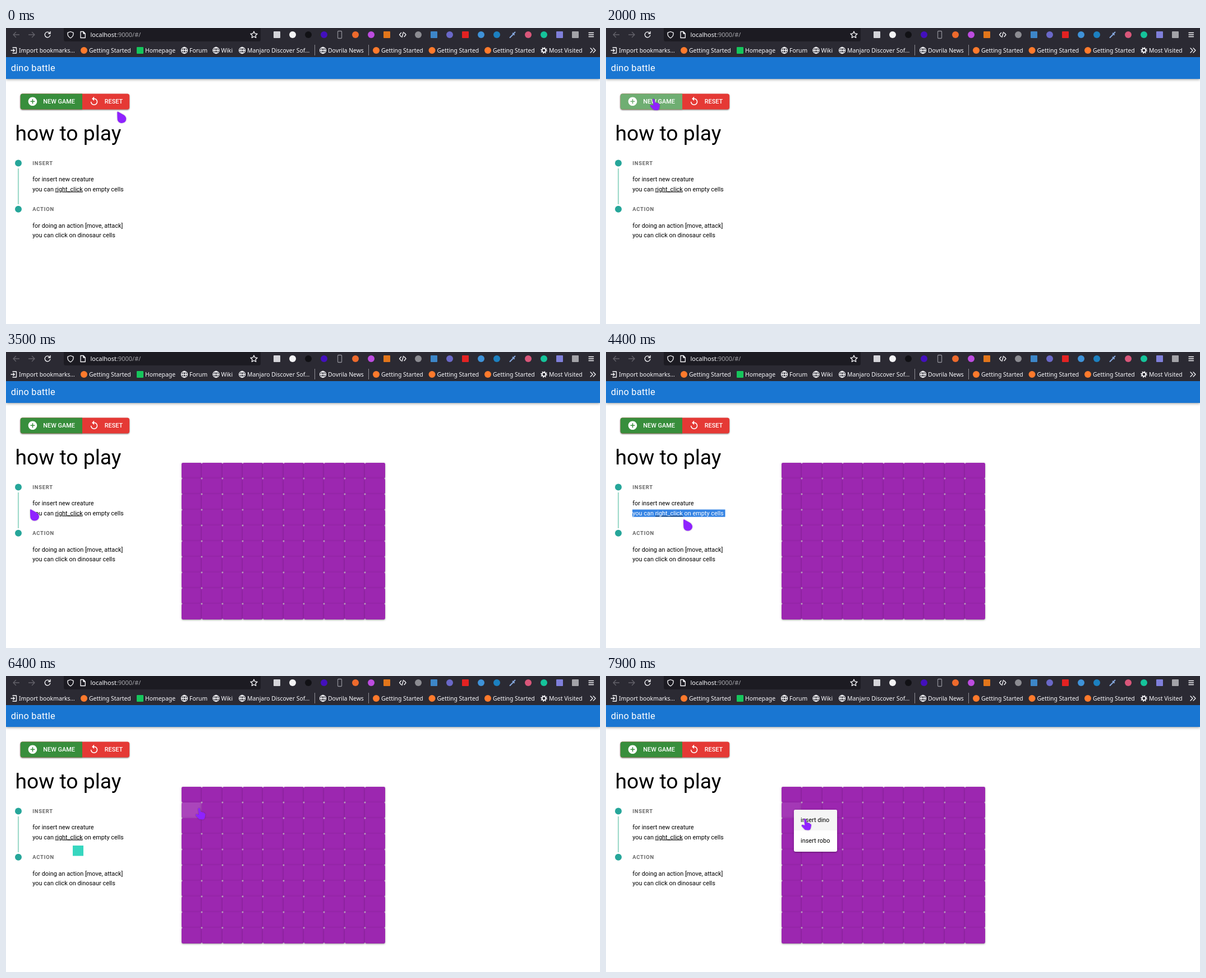
These frames come from a looping animation (1059 by 529 pixels, 8 s). An HTML page:

```html
<!DOCTYPE html>
<html lang="en">
<head>
<meta charset="utf-8">
<title>dino battle</title>
<style>
html, body { margin: 0; width: 100%; height: 100%; overflow: hidden; background: #fff; }
svg, #board, #menu { position: absolute; left: 0; top: 0; }
svg text { white-space: pre; font-family: Roboto, sans-serif; font-size: 10.9px; }
#chrome text { font-family: "Noto Sans", sans-serif; font-size: 10.4px; fill: #fbfbfe; }
.sub { font-weight: 700; letter-spacing: .78px; fill: #666; }
.btn { font-weight: 500; fill: #fff; }
.line { fill: none; stroke: #fbfbfe; stroke-width: 1.3; stroke-linecap: round; stroke-linejoin: round; }
.dim { stroke: #64636b; }
#board i, #menu, #menu b { position: absolute; }
#board i, #menu { box-shadow: 0 .8px 4px rgba(0,0,0,.2), 0 1.6px 1.6px rgba(0,0,0,.14), 0 2.3px .8px -1.6px rgba(0,0,0,.12); }
#board i { width: 36.35px; height: 28px; border-radius: 2.4px; background: #9c27b0; }
#menu { left: 334.5px; top: 239px; width: 77px; height: 74.5px; border-radius: 3px; background: #fff; overflow: hidden; }
#menu b {
  left: 0; width: 64.5px; height: 37.25px; padding-left: 12.5px;
  font: 400 10.9px/37.25px Roboto, sans-serif; color: #000;
}
</style>
</head>
<body>
<svg width="1059" height="529" viewBox="0 0 1059 529">
  <clipPath id="pill"><rect x="25.7" y="117.4" width="194.4" height="28" rx="4"/></clipPath>

  <rect y="52" width="1059" height="39" fill="#1976d2" style="filter:drop-shadow(0 1.6px 2.5px rgba(0,0,0,.4))"/>
  <text x="8.8" y="76.8" fill="#fff" style="font-size:16.4px;letter-spacing:.16px">dino battle</text>

  <g id="chrome">
    <rect width="1059" height="52" fill="#2b2a33"/>
    <path d="M103 0H454V20.5Q454 24 450.5 24H106.5Q103 24 103 20.5Z" fill="#1c1b22"/>
    <path class="line dim" d="M23.5 12H13M17.5 7.500L13 12L17.5 16.5M40.5 12H51M46.5 7.5L51 12L46.5 16.5"/>
    <path class="line" d="M78 9.2A4.8 4.8 0 1 0 78.8 12.8M79 6.5V10H75.5"/>
    <path class="line" d="M115 6.5L120 8.3V11.5Q119.5 15.5 115 17.8Q110.5 15.5 110 11.5V8.3Z"/>
    <path class="line" d="M133 6.5H138L141.3 10V17.5H133ZM138 6.5V10H141.3"/>
    <path class="line" d="M442 6L443.8 9.9L448 10.4L444.9 13.2L445.7 17.4L442 15.3L438.3 17.4L439.1 13.2L436 10.4L440.2 9.9Z"/>
    <text x="150.5" y="15.5" style="font-size:11px">localhost<tspan fill="#a5a5aa">:9000/#/</tspan></text>
    <rect class="line" x="591.5" y="5.5" width="7" height="13" rx="1.3" style="stroke:#8d8d95"/>
    <path class="line" d="M704.5 8.5L701.5 12L704.5 15.5M710 8.5L713 12L710 15.5M708.5 7.5L706 16.5"/>
    <path class="line" d="M898.5 17L904 11.5M903.5 9.5L906 12M905.5 9.5L907.5 7.5" style="stroke:#86a8de;stroke-width:2"/>
    <path class="line" d="M1039 8.5H1047.5M1039 12H1047.5M1039 15.5H1047.5"/>
    <path class="line" d="M12 35H18.5V45H12M9 40H15M13 37.8L15.2 40L13 42.2"/>
    <path d="M550.5 30V49M646.5 30V49" stroke="#8f8f95"/>
    <circle cx="959" cy="40" r="3.4" class="line" style="stroke-width:2"/>
    <circle cx="959" cy="40" r="5" class="line" style="stroke-width:1.8;stroke-dasharray:1.6 2.327;stroke-linecap:butt"/>
    <path class="line" d="M1042 36L1046 40L1042 44M1047 36L1051 40L1047 44"/>
  </g>

  <g style="filter:drop-shadow(0 1px 1.1px rgba(0,0,0,.5))">
    <g clip-path="url(#pill)">
      <rect x="25" y="117" width="196" height="29" fill="#e53935"/>
      <svg width="136" height="146">
        <rect x="25" y="117" width="111" height="29" fill="#388e3c"/>
        <rect id="hover" x="25" y="117" width="111" height="29" fill="#fff"/>
        <circle id="ripple" cx="86" cy="131" fill="#fff" fill-opacity=".17"/>
      </svg>
    </g>
  </g>
  <path transform="translate(38.1 121.9) scale(.78)" fill="#fff" d="M12 2C6.48 2 2 6.48 2 12s4.48 10 10 10 10-4.48 10-10S17.52 2 12 2zm5 11h-4v4h-2v-4H7v-2h4V7h2v4h4v2z"/>
  <path transform="translate(147.7 121.7) scale(.78)" fill="#fff" d="M12 5V1L7 6l5 5V7c3.31 0 6 2.69 6 6s-2.69 6-6 6-6-2.69-6-6H4c0 4.42 3.58 8 8 8s8-3.58 8-8-3.58-8-8-8z"/>
  <text class="btn" x="66.3" y="134.6">NEW GAME</text>
  <text class="btn" x="175.8" y="134.6">RESET</text>

  <text x="16.4" y="200.9" style="font-size:37.3px">how to play</text>
  <path d="M22 251V315" stroke="#9fdacb" stroke-width="2.2"/>
  <circle cx="22" cy="241.4" r="6" fill="#26a69a"/>
  <circle cx="22" cy="323.8" r="6" fill="#26a69a"/>
  <text class="sub" x="47.3" y="245" style="font-size:9.4px">INSERT</text>
  <text x="47.3" y="274.3">for insert new creature</text>
  <text x="47.3" y="291.5">you can <tspan text-decoration="underline">right_click</tspan> on empty cells</text>
  <text class="sub" x="47.3" y="327.4" style="font-size:9.4px">ACTION</text>
  <text x="47.3" y="356.7">for doing an action [move, attack]</text>
  <text x="47.3" y="373.9">you can click on dinosaur cells</text>

  <g id="select">
    <rect x="47" y="281.5" width="165.5" height="13.2" fill="#3584e4"/>
    <path d="M88 293.3H137" stroke="#10243e"/>
    <text x="47.3" y="291.5" fill="#fff">you can right_click on empty cells</text>
  </g>
  <rect id="badge" x="119" y="303" width="19" height="18.5" fill="#36d6bf"/>
</svg>

<div id="board"></div>
<div id="menu"><b id="dino" style="top:0">insert dino</b><b style="top:37.25px">insert robo</b></div>

<svg width="1059" height="529" viewBox="0 0 1059 529">
  <g id="cursor" fill="#8f22ff" style="filter:drop-shadow(0 .6px .8px rgba(0,0,0,.3))">
    <path id="drop" d="M0 1.2Q.2 -.3 1.6 .4L11.5 6Q16 9 16 13.5A8 8 0 0 1 .6 15.5Q0 12 0 1.2Z"/>
    <path id="hand" transform="translate(-6 -1.5)" d="M5 3Q5.5 0 8 1.5L9.8 8Q12 7 13 8.8Q15 8 15.6 10Q18 10 18 12.5L17 18Q16 22 12 21.5L7 21Q4 18 1 14.5Q0 12 2.2 11.8L6.5 13Z"/>
  </g>
</svg>

<script>
const LOOP = 8000, STEP = 100;
const $ = id => document.getElementById(id);

function add(tag, attrs, text = '') {
  const el = document.createElementNS('http://www.w3.org/2000/svg', tag);
  for (const k in attrs) el.setAttribute(k, attrs[k]);
  el.textContent = text;
  $('chrome').appendChild(el);
}

const marks = {
  dot: (x, y, fill) => add('circle', { cx: x, cy: y, r: 6, fill }),
  box: (x, y, fill) => add('rect', { x: x - 6, y: y - 6, width: 12, height: 12, rx: 1, fill }),
  globe: (x, y) => add('path', {
    class: 'line',
    d: `M${x - 5.5} ${y}a5.5 5.5 0 1 0 11 0a5.5 5.5 0 1 0 -11 0h11M${x} ${y - 5.5}q-5 5.5 0 11q5 -5.5 0 -11`
  })
};

// evenly spaced toolbar buttons; "-" leaves room for a drawn icon
`box#d5d5da dot#f4f4f6 dot#111115 dot#4310bd - dot#ed6a2c dot#bd4ce0 box#e2761b - dot#8c8c92 box#3d86c8
 dot#6a68c8 box#e32222 dot#3f92d8 dot#1c80c0 - dot#d9577a dot#15c39a box#7f7fda box#a3a3a8`
  .split(/\s+/).forEach((spec, i) => {
    const [kind, hex] = spec.split('#');
    if (hex) marks[kind](483 + 28 * i, 12, '#' + hex);
  });

function bookmark(x, label, kind, fill) {
  add('text', { x, y: 43.6 }, label);
  if (kind) marks[kind](x - 9, 40, fill);
}
bookmark(23, 'Import bookmarks...');
bookmark(248, 'Homepage', 'box', '#16c65c');
bookmark(327, 'Forum', 'globe');
bookmark(383.5, 'Wiki', 'globe');
bookmark(430, 'Manjaro Discover Sof...', 'globe');
bookmark(574, 'Dovrila News', 'globe');
bookmark(968, 'Most Visited');
for (const x of [148, 669, 768.5, 868]) bookmark(x, 'Getting Started', 'dot', '#ff7a2c');

for (let i = 0; i < 100; i++) {
  const cell = document.createElement('i');
  cell.style.left = 313 + (i % 10) * 36.35 + 'px';
  cell.style.top = 197.7 + Math.floor(i / 10) * 28 + 'px';
  $('board').appendChild(cell);
}
const hot = $('board').children[10];

// pointer moves: first step, last step, end point
const moves = [
  [300, 400, 198.3, 157], [800, 900, 153, 166], [1000, 1000, 128, 155.5], [1100, 1600, 84, 127],
  [3100, 3200, 43, 281], [3700, 3700, 43.5, 289], [4100, 4400, 138, 299], [4600, 4700, 196, 298],
  [5400, 5700, 204, 313], [5900, 6100, 321, 253], [6400, 6400, 343.5, 236.5],
  [6700, 7000, 334, 238], [7400, 7900, 354, 255.5]
];

const clamp = v => Math.min(1, Math.max(0, v));
const fade = (t, from, to) => clamp((t - from) / (to - from));
const show = (id, on) => { $(id).style.display = on ? '' : 'none'; };

function pointer(t) {
  let x = 198.3, y = 149.3;
  for (const [from, to, nx, ny] of moves) {
    const k = fade(t, from - STEP, to);
    x += (nx - x) * k;
    y += (ny - y) * k;
  }
  return [x, y];
}

function draw(ms) {
  const t = Math.floor(ms / STEP) * STEP;
  const [x, y] = pointer(t);
  const onButton = x > 26 && x < 136 && y > 118 && y < 146;
  const hand = onButton || t >= 6400;
  $('cursor').setAttribute('transform', `translate(${x} ${y})`);
  show('drop', !hand);
  show('hand', hand);

  $('hover').setAttribute('fill-opacity', .13 * fade(t, 1200, 1500) * (1 - fade(t, 3000, 3200)));
  $('ripple').setAttribute('r', t < 2400 ? 120 * fade(t, 1700, 2000) : 0);

  const white = `rgba(255,255,255,${t < 6400 ? 0 : t < 7900 ? .14 : .08})`;
  hot.style.backgroundImage = `linear-gradient(${white},${white})`;
  show('board', t >= 2400);
  show('select', t >= 4100 && t < 5600);
  show('badge', t >= 5100 && t < 7400);
  show('menu', t >= 7200);
  $('dino').style.background = t >= 7400 ? '#f5f5f5' : '';
}

const start = performance.now();
function tick() {
  draw((performance.now() - start) % LOOP);
  requestAnimationFrame(tick);
}
tick();
</script>
</body>
</html>
```
